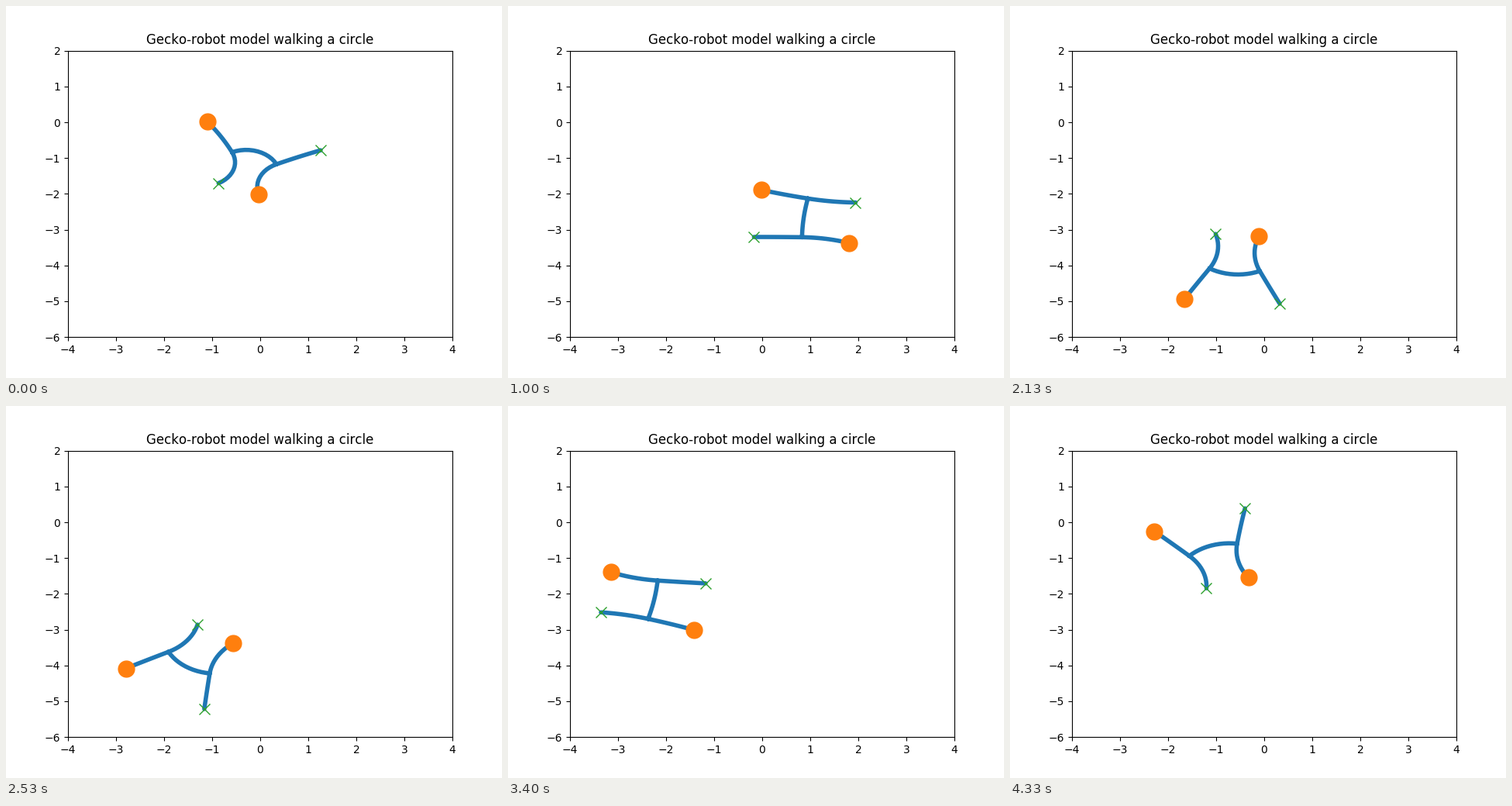
Recreate the animation shown at these times as a matplotlib script. Size 640x480 px, loop 4.39 s.

```python
import numpy as np
import matplotlib.pyplot as plt
from matplotlib.animation import FuncAnimation

plt.rcParams["text.kerning_factor"] = 6

LOOP_MS, FRAMES = 4390, 198
TICK = LOOP_MS / FRAMES
STEPS = 66
# 15 steps a second, on a clock of 10 ms
STEP_STARTS = np.round(np.arange(STEPS) * 100 / 15) * 10

CYCLE = 6                       # steps per gait cycle
TURN = -31                      # degrees turned per cycle
CENTER = np.array([-0.67, -2.49])
LEG, TORSO = 1.0, 1.09

# Bend in degrees: front left, front right, torso, rear left, rear right
BENDS = {
    "curled": (-4, 83, -90, 12, -86),
    "opening": (1, 49, -56, 1, -46),
    "stretched": (-17, 1, 11, 11, -4),
    "closing": (-3, 44, -54, 1, -49),
}

# Torso placement: cycle, radius, angle on the circle, heading
PLACES = {
    "curled": [(0, 1.582, 69.8, -20), (4, 1.62, 70.5, -20), (10, 1.65, 70.5, -20)],
    "opening": [(1, 1.594, 62.8, -28.5), (4, 1.617, 67.4, -29), (6, 1.643, 66.5, -29)],
    "stretched": [(2, 1.57, 55.4, -34.4), (8, 1.638, 56.5, -32.5)],
    "closing": [(0, 1.68, 52.8, -31), (10, 1.764, 52.8, -31)],
}

# Each half cycle: swap the fixed feet, move halfway, move fully
GAIT = ["curled", "curled", "opening", "stretched", "stretched", "closing"]


def unit(degrees):
    a = np.radians(degrees)
    return np.stack([np.cos(a), np.sin(a)], axis=-1)


def arc(start, direction, bend, length, n=12):
    """Points along a circular arc that turns by `bend` degrees."""
    steps = unit(direction + bend * (np.arange(n) + 0.5) / n) * length / n
    return np.vstack([start, start + np.cumsum(steps, axis=0)])


def limbs(step):
    """Torso and the four legs (FL, FR, RL, RR) as point arrays."""
    cycle, phase = divmod(step, CYCLE)
    pose = GAIT[phase]
    fl, fr, bend, rl, rr = BENDS[pose]
    cycles, *columns = zip(*PLACES[pose])
    radius, angle, heading = (np.interp(cycle, cycles, c) for c in columns)
    middle = CENTER + radius * unit(angle + TURN * cycle)
    heading += TURN * cycle

    rear_dir, front_dir = heading - bend / 2, heading + bend / 2
    torso = arc(np.zeros(2), rear_dir, bend, TORSO)
    torso += middle - torso[-1] / 2
    rear, front = torso[0], torso[-1]
    legs = [
        arc(front, front_dir + 90, fl, LEG),
        arc(front, front_dir - 90, fr, LEG),
        arc(rear, rear_dir + 90, rl, LEG),
        arc(rear, rear_dir - 90, rr, LEG),
    ]
    return torso, legs


fig, ax = plt.subplots(figsize=(6.4, 4.8), dpi=100)
ax.set(xlim=(-4, 4), ylim=(-6, 2), title="Gecko-robot model walking a circle")
body, = ax.plot([], [], color="C0", lw=4, solid_capstyle="round",
                solid_joinstyle="round")
fixed, = ax.plot([], [], "o", color="C1", ms=15)
free, = ax.plot([], [], "x", color="C2", ms=10)


def update(frame):
    # The step that has begun by the end of this frame
    step = int(np.searchsorted(STEP_STARTS, (frame + 1) * TICK)) - 1
    torso, legs = limbs(step)
    gap = np.full((1, 2), np.nan)
    path = np.vstack([p for limb in [torso, *legs] for p in (limb, gap)])
    body.set_data(*path.T)

    feet = np.array([leg[-1] for leg in legs])
    left_front, right_front = feet[[0, 3]], feet[[1, 2]]
    if step % CYCLE in (1, 2, 3):
        grip, swing = left_front, right_front
    else:
        grip, swing = right_front, left_front
    fixed.set_data(*grip.T)
    free.set_data(*swing.T)
    return body, fixed, free


anim = FuncAnimation(fig, update, frames=FRAMES, interval=TICK, repeat=True)
plt.show()
```
